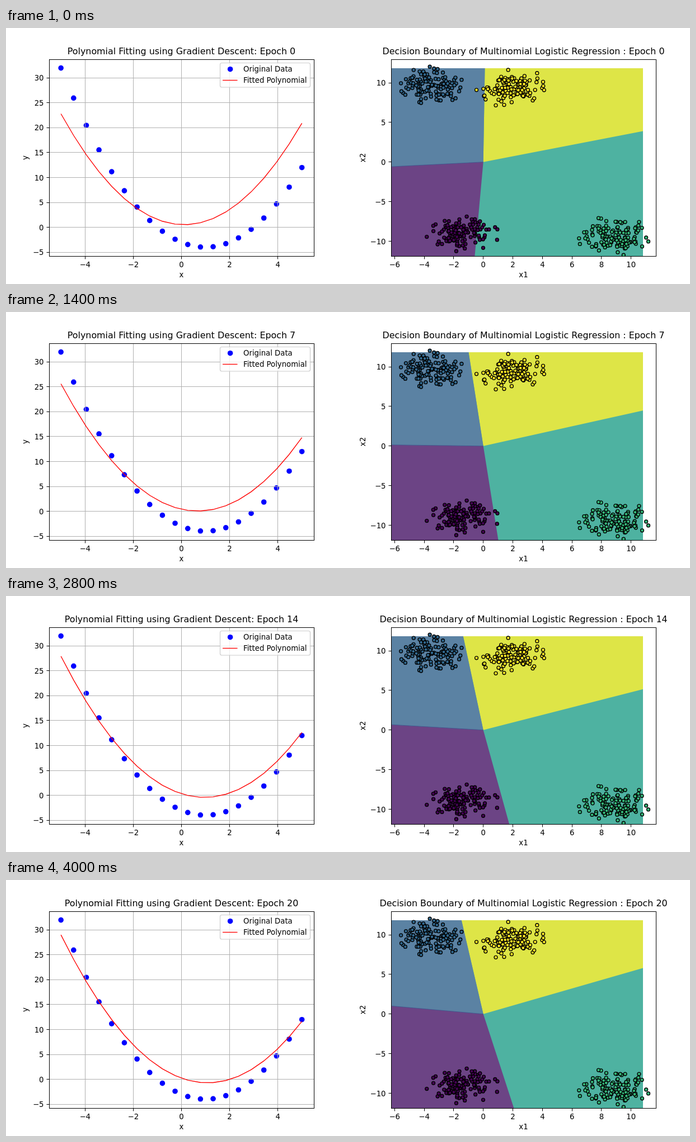
An HTML page with a canvas that plays this animation: 1222 by 458 pixels, repeating every 4200 ms.

```html
<!DOCTYPE html>
<html lang="en">
<head>
<meta charset="utf-8">
<title>Gradient descent</title>
<style>
html, body { margin: 0; width: 100%; height: 100%; overflow: hidden; background: #fff; }
canvas { display: block; }
</style>
</head>
<body>
<canvas id="stage" width="1222" height="458"></canvas>
<script>
const g = document.getElementById('stage').getContext('2d');
const STEP = 200, EPOCHS = 21;
const TOP = 56.5, BOTTOM = 408.5;

const range = (from, to, step) =>
  Array.from({ length: (to - from) / step + 1 }, (_, i) => from + i * step);

const fitPlot = {
  left: 77.5, right: 550.5,
  px: x => 313.4 + x * 43.05, py: y => 356.56 - y * 8.905,
  xTicks: range(-4, 4, 2), yTicks: range(-5, 30, 5),
  xName: 'x', yName: 'y', yNameX: 38.5, title: 'Polynomial Fitting using Gradient Descent: Epoch '
};
const classPlot = {
  left: 688.5, right: 1161.5,
  px: x => 852.7 + x * 26.41, py: y => 239.8 - y * 14.17,
  xTicks: range(-6, 10, 2), yTicks: range(-10, 10, 5),
  xName: 'x1', yName: 'x2', yNameX: 641.5, title: 'Decision Boundary of Multinomial Logistic Regression : Epoch '
};

// Samples of x² - 2x - 3 and the descent towards it
const xs = Array.from({ length: 20 }, (_, i) => -5 + i * 10 / 19);
const mean = f => xs.reduce((sum, x) => sum + f(x), 0) / xs.length;
const truth = x => x * x - 2 * x - 3;
const fits = [{ a: 0.853, b: -0.19, c: 0.53 }];
while (fits.length < EPOCHS) {
  const { a, b, c } = fits[fits.length - 1];
  const error = x => a * x * x + b * x + c - truth(x);
  const rate = 0.01;
  fits.push({
    a: a - rate * mean(x => error(x) * x * x),
    b: b - rate * mean(x => error(x) * x),
    c: c - rate * mean(error)
  });
}

// Four seeded normal clusters with unit spread
let seed = 11;
function random() {
  seed = (seed * 1664525 + 1013904223) % 4294967296;
  return seed / 4294967296;
}
function cluster(fill, x, y) {
  const points = Array.from({ length: 125 }, () => {
    const r = Math.sqrt(-2 * Math.log(1 - 0.96 * random()));
    const turn = random() * 2 * Math.PI;
    return [x + r * Math.cos(turn), y + r * Math.sin(turn)];
  });
  return { fill, points };
}
const clusters = [
  cluster('#440154', -1.4, -8.9),
  cluster('#31688e', -3.5, 9.6),
  cluster('#35b779', 8.8, -9.4),
  cluster('#fde725', 1.9, 9.4)
];

function trace(points) {
  g.beginPath();
  points.forEach(([x, y]) => g.lineTo(x, y));
}
function line(points, color, width) {
  trace(points);
  g.strokeStyle = color;
  g.lineWidth = width;
  g.stroke();
}
function area(points, color) {
  trace(points);
  g.fillStyle = color;
  g.fill();
}
function dot(x, y, r, fill) {
  g.beginPath();
  g.arc(x, y, r, 0, 2 * Math.PI);
  g.fillStyle = fill;
  g.fill();
}
function text(str, x, y, align = 'center', size = 13.25) {
  g.font = size + 'px "DejaVu Sans", Verdana, sans-serif';
  g.textAlign = align;
  g.fillStyle = '#000';
  g.fillText(str, x, y);
}
const snap = v => Math.floor(v) + 0.5;
const label = n => String(n).replace('-', '\u2212');

function clipped(p, draw) {
  g.save();
  g.beginPath();
  g.rect(p.left, TOP, p.right - p.left, BOTTOM - TOP);
  g.clip();
  draw();
  g.restore();
}

function axes(p, epoch) {
  for (const n of p.xTicks) {
    const x = snap(p.px(n));
    line([[x, BOTTOM], [x, BOTTOM + 5]], '#000', 1);
    text(label(n), p.px(n), 428);
  }
  for (const n of p.yTicks) {
    const y = snap(p.py(n));
    line([[p.left, y], [p.left - 5, y]], '#000', 1);
    text(label(n), p.left - 10, Math.round(p.py(n) + 5), 'right');
  }
  g.strokeStyle = '#000';
  g.lineWidth = 1;
  g.strokeRect(p.left, TOP, p.right - p.left, BOTTOM - TOP);
  const middle = (p.left + p.right) / 2 - 0.5;
  text(p.title + epoch, middle, 47, 'center', 15.9);
  text(p.xName, middle, 446);
  g.save();
  g.translate(p.yNameX, 232);
  g.rotate(-Math.PI / 2);
  text(p.yName, 0, 0);
  g.restore();
}

function legend() {
  g.beginPath();
  g.roundRect(382.5, 62.5, 161, 43.5, 3);
  g.fillStyle = 'rgba(255,255,255,.8)';
  g.fill();
  g.strokeStyle = '#ccc';
  g.lineWidth = 1.2;
  g.stroke();
  dot(400.6, 73.7, 4.8, '#00f');
  line([[387, 93.5], [413.5, 93.5]], '#f00', 1.35);
  text('Original Data', 424, 77.5, 'left');
  text('Fitted Polynomial', 424, 97.5, 'left');
}

function drawFit(epoch) {
  const p = fitPlot, { a, b, c } = fits[epoch];
  xs.forEach(x => dot(p.px(x), p.py(truth(x)), 4.8, '#00f'));
  p.xTicks.forEach(n => line([[snap(p.px(n)), TOP], [snap(p.px(n)), BOTTOM]], '#b0b0b0', 1));
  p.yTicks.forEach(n => line([[p.left, snap(p.py(n))], [p.right, snap(p.py(n))]], '#b0b0b0', 1));
  line(xs.map(x => [p.px(x), p.py(a * x * x + b * x + c)]), '#f00', 1.35);
  axes(p, epoch);
  legend();
}

function drawClasses(epoch) {
  const p = classPlot;
  const l = p.left, r = 1138, t = 72, b = BOTTOM;
  const hub = [p.px(0), p.py(0)];
  const up = [811.8 + 43.7 * Math.exp(-0.156 * epoch), t];
  const west = [l, 209.8 + 38.3 * Math.exp(-0.045 * epoch)];
  const east = [r, 184.4 - 1.05 * epoch - 0.015 * epoch * epoch];
  const down = [916.4 - 79 * Math.exp(-0.109 * epoch), b];
  clipped(p, () => {
    area([[l, t], [r, t], [r, b], [l, b]], '#4eb2a1');
    area([hub, up, [r, t], east], '#dee547');
    area([hub, down, [l, b], west], '#6c4485');
    area([hub, west, [l, t], up], '#5b82a3');
    line([hub, west], 'rgba(62,80,140,.8)', 1);
    for (const { fill, points } of clusters) {
      for (const [x, y] of points) {
        dot(p.px(x), p.py(y), 2.95, fill);
        g.strokeStyle = '#000';
        g.lineWidth = 1.35;
        g.stroke();
      }
    }
  });
  axes(p, epoch);
}

function frame() {
  const epoch = Math.floor(performance.now() / STEP) % EPOCHS;
  g.fillStyle = '#fff';
  g.fillRect(0, 0, 1222, 458);
  drawFit(epoch);
  drawClasses(epoch);
  requestAnimationFrame(frame);
}
frame();
</script>
</body>
</html>
```
